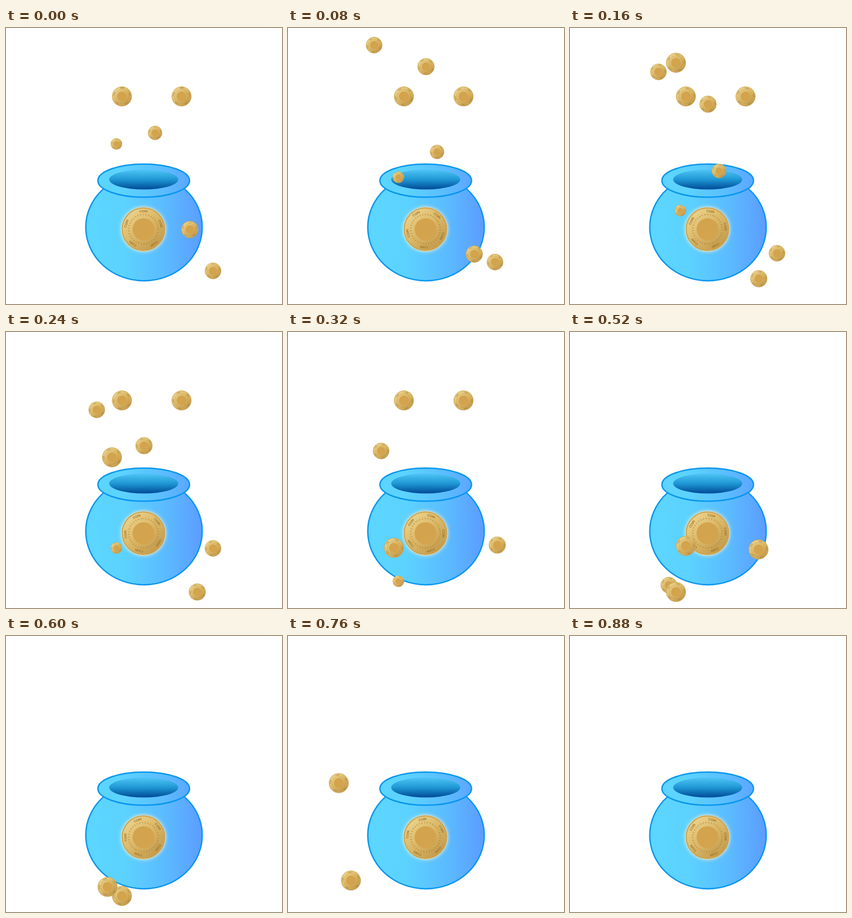
Write an HTML page with a canvas that moves like this. It is 500 px wide and 500 px high and loops after 0.92 s.

```html
<!DOCTYPE html>
<html lang="en">
<head>
<meta charset="utf-8">
<title>Coin pot</title>
<style>
  html, body { margin: 0; width: 100%; height: 100%; overflow: hidden; background: #fff; }
  canvas { display: block; width: 100vw; height: 100vh; }
</style>
</head>
<body>
<canvas id="stage" width="500" height="500"></canvas>
<script>
const ctx = document.getElementById('stage').getContext('2d');
const STEP = 40, STEPS = 23, TURN = Math.PI * 2, FLOOR = 471;

// Speeds are pixels per step. A coin waits at (x, y) until `drop`, falls to the
// floor, and from `bounce` on flies off with its kick (kx, ky).
const coins = [
  { r: 18, x: 210, y: 124, drop: 8, speed: 52.7, bounce: 15, kx: -24, ky: -7, to: 20 },
  { r: 18, x: 318, y: 124, drop: 8, speed: 54, drift: 4.7, to: 13 },
  { r: 13, x: 270, y: 190, speed: 17.25, to: 5 },
  { r: 10.5, x: 200, y: 210, speed: 30.2, to: 9 },
  { r: 15.5, x: 333, y: 365, speed: 22.3, drift: 2.25, bounce: 6, kx: 16.3, ky: -42.5, to: 10 },
  { r: 15, x: 375, y: 440, speed: -8, to: 6 },
  { r: 15, x: 156, y: 31, from: 2, speed: 21, gravity: 3.25, drift: 2.1, to: 13 },
  { r: 15.5, x: 250, y: 36, from: 1, speed: 34, to: 7 },
  { r: 18, x: 192, y: -19, from: 3, speed: 82, bounce: 14.65, kx: -23, ky: -47, to: 21 },
  { r: 15, x: 375, y: 170, from: 10, speed: 50, to: 12 }
];

function position(coin, step) {
  const { x, y, from = 0, drop = from, speed, gravity = 0, drift = 0,
          bounce = Infinity, kx = 0, ky = 0, to } = coin;
  if (step < from || step > to) return null;
  const fall = Math.max(0, Math.min(step, bounce) - drop);
  const flight = Math.max(0, step - bounce);
  const height = Math.min(FLOOR, y + speed * fall + gravity * fall * fall / 2);
  return [x + drift * fall + (flight && kx * flight), height + (flight && ky * flight)];
}

function linear(x0, y0, x1, y1, colors) {
  const g = ctx.createLinearGradient(x0, y0, x1, y1);
  colors.forEach((c, i) => g.addColorStop(i / (colors.length - 1), c));
  return g;
}

function ellipse(x, y, rx, ry, fill, stroke, width) {
  ctx.beginPath();
  ctx.ellipse(x, y, rx, ry, 0, 0, TURN);
  if (fill) { ctx.fillStyle = fill; ctx.fill(); }
  if (stroke) { ctx.strokeStyle = stroke; ctx.lineWidth = width; ctx.stroke(); }
}

function drawPot() {
  const blue = linear(144, 0, 356, 0, ['#5cd6ff', '#5cd2ff', '#5bbcff', '#5c9cff']);
  ellipse(250, 361, 105.5, 97, blue, '#0a96ee', 2.5);
  ellipse(249.5, 276.5, 83, 30, blue, '#0a96ee', 2.5);
  ellipse(249.5, 274.5, 62.5, 18, linear(0, 257, 0, 292, ['#4cc4f4', '#1f97d4', '#004c98']));
}

// Drawn at radius 40, then scaled.
function drawCoin(x, y, r, angle) {
  ctx.save();
  ctx.translate(x, y);
  ctx.scale(r / 40, r / 40);
  ellipse(0, 0, 39, 39, linear(-26, -30, 26, 30, ['#ebd189', '#dab766', '#c49b4e']), '#c9a354', 2);
  ctx.rotate(angle);
  ctx.setLineDash([2, 3]);
  ellipse(0, 0, 27, 27, null, 'rgba(160,115,45,.4)', 3);
  ctx.setLineDash([]);
  ellipse(0, 0, 20, 20, '#d3a44d');
  ctx.fillStyle = '#9c752f';
  ctx.font = 'bold 6px Arial, "Liberation Sans", sans-serif';
  ctx.textAlign = 'center';
  for (let i = 0; i < 5; i++) {
    ctx.fillText('COIN', 0, -31);
    ctx.rotate(TURN / 5);
  }
  ctx.restore();
}

function drawBadge(angle) {
  ctx.save();
  ctx.shadowColor = '#fff2cc';
  ctx.shadowBlur = 7;
  ellipse(249, 364.5, 40, 40, '#f3e0aa');
  ctx.restore();
  drawCoin(249, 364.5, 39.5, angle);
}

function draw(now) {
  const step = Math.floor(now / STEP) % STEPS;
  const angle = -TURN * step / STEPS;
  ctx.fillStyle = '#fff';
  ctx.fillRect(0, 0, 500, 500);
  drawPot();
  drawBadge(angle);
  for (const coin of coins) {
    const at = position(coin, step);
    if (at) drawCoin(...at, coin.r, angle);
  }
}

const start = performance.now();
function tick() {
  draw(performance.now() - start);
  requestAnimationFrame(tick);
}
tick();
</script>
</body>
</html>
```
